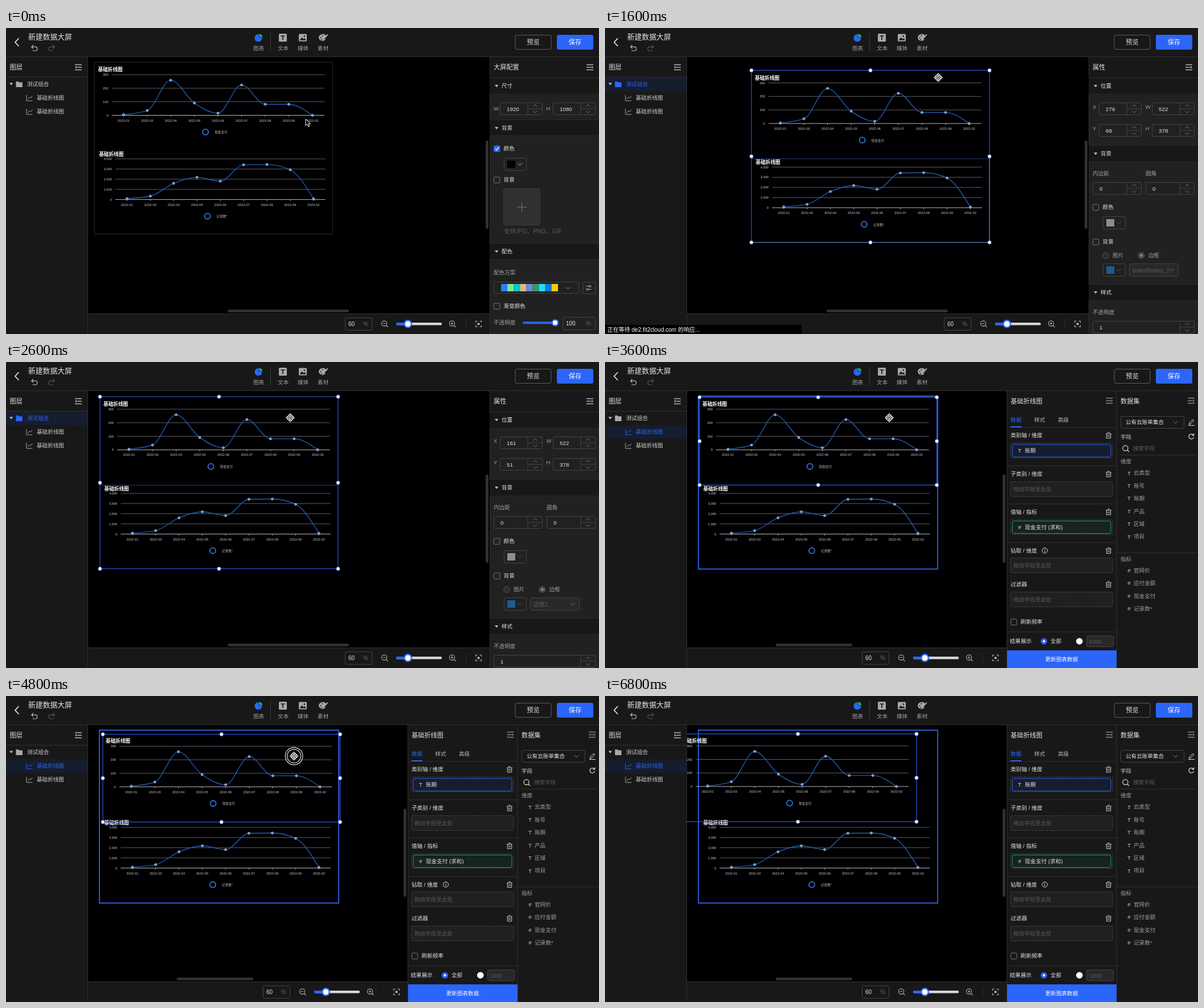
An HTML page for the animation above (6.9 s loop, 1041 by 538 pixels).

```html
<!DOCTYPE html>
<html lang="zh-CN">
<head>
<meta charset="utf-8">
<style>
html, body { margin: 0; width: 100%; height: 100%; overflow: hidden; background: #000; }
svg { display: block; width: 100%; height: 100%; font-family: "Liberation Sans", "Noto Sans CJK SC", "Noto Sans CJK JP", sans-serif; }
text { white-space: pre; }
</style>
</head>
<body>
<svg id="stage" viewBox="0 0 1041 538" xmlns="http://www.w3.org/2000/svg"></svg>
<script>
const BLUE = '#2b65fa', LIGHT = '#e4e4e4', GRAY = '#a0a0a0', DIM = '#5c5c5c';
const EDGE = '#444', BAR = '#181818', BODY = '#212121', RULE = '#303030';

// --- drawing helpers ---
const rect = (x, y, w, h, fill, stroke = 'none', r = 0, more = '') =>
  `<rect x="${x}" y="${y}" width="${w}" height="${h}" rx="${r}" fill="${fill}" stroke="${stroke}" ${more}/>`;
const line = (d, color, w = 1, more = '') =>
  `<path d="${d}" fill="none" stroke="${color}" stroke-width="${w}" ${more}/>`;
const shape = (d, fill, more = '') => `<path d="${d}" fill="${fill}" ${more}/>`;
const disc = (x, y, r, fill, stroke = 'none', w = 1) =>
  `<circle cx="${x}" cy="${y}" r="${r}" fill="${fill}" stroke="${stroke}" stroke-width="${w}"/>`;
const text = (x, y, s, fill = LIGHT, size = 9.6, more = '') =>
  `<text x="${x}" y="${y + size * .36}" font-size="${size}" fill="${fill}" ${more}>${s}</text>`;
const mid = 'text-anchor="middle"', end = 'text-anchor="end"';
const group = (id, body, more = '') => `<g id="${id}" ${more}>${body}</g>`;
const at = (x, y, body) => `<g transform="translate(${x} ${y})">${body}</g>`;

// --- small controls ---
const chevron = (x, y, s = 4, color = '#888', dir = 1) =>
  line(`M${x - s} ${y - dir * s / 2}l${s} ${dir * s}l${s} ${-dir * s}`, color);
const caret = (x, y) => shape(`M${x - 3} ${y - 2}h6.4l-3.2 4.2z`, '#bbb');
const box = (x, y, w, h, fill = 'none') => rect(x + .5, y + .5, w - 1, h - 1, fill, EDGE, 2.5);
const check = (y, label, on, x = 856) =>
  rect(x + .5, y - 5, 10.4, 10.4, on ? BLUE : 'none', on ? BLUE : '#777', 1.5) +
  (on ? line(`M${x + 3} ${y}l2.3 2.5l4-5`, '#fff', 1.3) : '') + text(x + 17.6, y, label);
const spin = (x, y, w, value, id = '', pad = 12) => {
  const s = x + w - 26;
  return box(x, y, w, 22) + line(`M${s} ${y}v22M${s} ${y + 11}h26`, EDGE) +
    chevron(s + 13, y + 5.5, 3.6, '#777', -1) + chevron(s + 13, y + 16.5, 3.6, '#777') +
    text(x + pad, y + 11.5, value, LIGHT, 9.8, id && `id="${id}"`);
};
const swatch = (y, fill, color) => box(874, y, 40, 23) + rect(880, y + 5, 14, 13, fill) + chevron(902, y + 11.5, 4, color);
const section = (y, h, name) =>
  rect(849, y, 192, h, BAR) + line(`M849 ${y + .5}h192M849 ${y + h - .5}h192`, '#2a2a2a') +
  caret(861, y + 15) + text(870, y + 14.5, name);
const foldIcon = (x, y, dir, color = '#b5b5b5') =>
  line(`M${x - 6} ${y - 4.5}h12M${x - 6 + (dir < 0 ? 4 : 0)} ${y}h8M${x - 6} ${y + 4.5}h12`, color, 1.3) +
  shape(`M${x + dir * 6} ${y}l${-dir * 3} -2.3v4.6z`, color);
const trash = (x, y) =>
  line(`M${x - 5} ${y - 3}h10M${x - 2} ${y - 5}h4M${x - 3.7} ${y - 3}v8h7.4v-8M${x - 1.2} ${y - 1}v4M${x + 1.2} ${y - 1}v4`, '#ccc');
const chartIcon = (y, color) =>
  line(`M36 ${y - 5}v10h10.5M38.5 ${y + 2}l2.8-3.5l2 1.6l3-3.6`, color);
const knob = (x, y, r) => disc(x, y, r, '#fff', BLUE, 2.4);
const handles = (x, y, w, h) =>
  [[0, 0], [.5, 0], [1, 0], [0, .5], [1, .5], [0, 1], [.5, 1], [1, 1]]
    .map(([a, b]) => disc(x + a * w, y + b * h, 3.1, '#fff', '#5c86d8', .9)).join('');

// --- line charts ---
const MONTHS = ['01', '03', '04', '05', '06', '07', '08', '09', '02'];

function smooth(pts) {
  const n = pts.length, dx = pts[1][0] - pts[0][0];
  const s = pts.slice(1).map((p, i) => (p[1] - pts[i][1]) / dx);
  const m = pts.map((_, i) => {
    if (!i || i === n - 1) return 0;
    const a = s[i - 1], b = s[i];
    return (Math.sign(a) + Math.sign(b)) * Math.min(Math.abs(a), Math.abs(b), Math.abs(a + b) / 4);
  });
  m[0] = (3 * s[0] - m[1]) / 2;
  m[n - 1] = (3 * s[n - 2] - m[n - 2]) / 2;
  let d = `M${pts[0]}`;
  for (let i = 1; i < n; i++) {
    const [x0, y0] = pts[i - 1], [x1, y1] = pts[i], k = dx / 3;
    d += `C${x0 + k},${y0 + k * m[i - 1]} ${x1 - k},${y1 - k * m[i]} ${x1},${y1}`;
  }
  return d;
}

function chart({ x, y, w, step, rows, gap, first, ys, tx, ty, ring, legend }) {
  const base = y + gap * (rows.length - 1);
  const pts = ys.map((v, i) => [first + i * step, v]);
  return rows.map((r, i) => {
    const gy = y + i * gap;
    return line(`M${x} ${gy}h${w}`, i < rows.length - 1 ? '#6a6a6a' : '#d0d0d0', .9) +
      text(x - 6, gy, r, '#d0d0d0', 5.76, end);
  }).join('') +
    pts.map(([px], i) => line(`M${px} ${base}v2.6`, '#d0d0d0', .8) +
      text(px, base + 9, '2022-' + MONTHS[i], '#d0d0d0', 5.76, mid)).join('') +
    line(smooth(pts), '#2a6fd0', 1.1) +
    pts.map(([px, py]) => disc(px, py, 1.8, '#2a7be0', '#e8f2ff', .9)).join('') +
    text(tx, ty, '基础折线图', '#fff', 8.64, 'font-weight="700"') +
    disc(ring[0], ring[1], 5, 'none', '#2f78dc', 1.8) +
    text(ring[0] + 16, ring[1] + .3, legend, '#bdbdbd', 5.6);
}

const chart1 = chart({ x: 195, y: 83, w: 373.5, step: 41.43, rows: ['300', '200', '100', '0'], gap: 23.8,
  first: 215.8, ys: [153.3, 146, 92.7, 132.8, 150.7, 101.2, 135, 135, 154.4],
  tx: 171, ty: 74, ring: [359.6, 183.7], legend: '现金支付' });
const chart2 = chart({ x: 201.3, y: 231, w: 368.7, step: 40.94, rows: ['4,000', '3,000', '2,000', '1,000', '0'], gap: 17.87,
  first: 221.8, ys: [300.8, 296.5, 274, 263.4, 270.1, 241.4, 240.9, 250.2, 301.2],
  tx: 172.6, ty: 222.5, ring: [363, 331.7], legend: '记录数*' });

// --- fixed frame ---
const toolbar = rect(0, 0, 1041, 51, BAR) + line('M0 50.5h1041', RULE) +
  line('M22.5 18l-6.5 7l6.5 7', '#f2f2f2', 1.6) + text(39, 15.5, '新建数据大屏', LIGHT, 12.8) +
  line('M48 30l-3.2 3.2l3.2 3.2M45 33.2h6.5a3.4 3.4 0 0 1 0 6.8h-5', '#bdbdbd', 1.2) +
  line('M82 30l3.2 3.2l-3.2 3.2M85 33.2h-6.5a3.4 3.4 0 0 0 0 6.8h5', '#555', 1.2) +
  disc(443, 17.5, 6.6, BLUE) + shape('M444.2 16.3v-6.3a6.4 6.4 0 0 1 6.3 6.3z', '#22b573', `stroke="${BAR}" stroke-width=".8"`) +
  line('M464.5 9v32', '#3c3c3c') +
  rect(479, 10, 14, 14, '#a8a8a8', 'none', 1.5) + line('M482.5 14h7M486 14v7', BAR, 1.7) +
  rect(514, 10.5, 14, 13, '#a8a8a8', 'none', 1.5) + shape('M515.5 21.5l4-5l3 3l1.8-1.8l2.5 3.8z', BAR) + disc(523.8, 14.4, 1.3, BAR) +
  shape('M549 17.5a7 6.8 0 0 1 13-3.5l-5 5l4 1a6.8 6.8 0 0 1-12-2.5z', '#a8a8a8') +
  line('M564.8 11.5l-7.5 8', '#a8a8a8', 2) + disc(552.5, 17, 1.1, BAR) + disc(555.5, 13.6, 1.1, BAR) + disc(554, 20.6, 1.1, BAR) +
  ['图表', '文本', '媒体', '素材'].map((s, i) => text([443.5, 486.5, 521.5, 556.7][i], 35.5, s, GRAY, 9.6, mid)).join('') +
  rect(894, 12.5, 63, 25, 'none', '#5c5c5c', 3) + text(925.5, 25, '预览', LIGHT, 11.2, mid) +
  rect(967, 12, 64, 26, BLUE, 'none', 3) + text(999, 25, '保存', '#fff', 11.2, mid);

const layerRow = (i, label) => {
  const y = 99 + 24 * i;
  const draw = (icon, color) => (i ? chartIcon(y, icon) : shape(`M17.5 ${y - 5}h4l1.4 1.6h6v8.4h-11.4z`, icon)) +
    text(i ? 54 : 37, y, label, color);
  return group('row' + i, draw('#a8a8a8', '#d0d0d0')) +
    group('rowOn' + i, rect(0, y - 12, 143, 24, '#151d2e') + draw(BLUE, BLUE));
};
const layers = rect(0, 51, 144, 487, BAR) + line('M143.5 51v487M0 86.5h143', RULE) +
  text(6.5, 69, '图层', LIGHT, 11.2) + foldIcon(127, 69, -1) +
  layerRow(0, '测试组合') + layerRow(1, '基础折线图') + layerRow(2, '基础折线图') + caret(9, 98.5);

const lens = (x, plus) => disc(x - 1, 519.5, 4.6, 'none', '#b0b0b0', 1.1) +
  line(`M${x + 2.5} 523l3 3M${x - 3.2} 519.5h4.4${plus ? `M${x - 1} 517.3v4.4` : ''}`, '#b0b0b0', 1.1);
const zoomBar = rect(100, 502, 941, 36, BAR) + line('M100 502.5h941', RULE) +
  box(595, 509, 48, 23) + text(601, 520.5, '60', LIGHT, 10) + text(627, 520.5, '%', '#666', 10) +
  lens(665) + lens(784, true) + rect(685, 518, 80, 4.4, '#d4d6da', 'none', 2) + rect(685, 518, 21, 4.4, BLUE, 'none', 2) +
  knob(705.5, 520.3, 6.3) + line('M807.5 513v15', '#2c2c2c') +
  line('M824.5 518v-2.7h3M831.5 515.3h3v2.7M834.5 522.5v2.8h-3M827.5 525.3h-3v-2.8', '#b8b8b8', 1.1) + disc(829.5, 520.3, 2.1, '#b8b8b8');

// --- right panels ---
const side = title => rect(849, 51, 192, 487, BODY) + rect(849, 51, 192, 36, BAR) + line('M849.5 51v487', RULE) +
  text(856, 69, title, LIGHT, 11.2) + foldIcon(1025, 69, 1);
const PALETTE = ['#2583f3', '#86e58a', '#08c4cd', '#dcb78a', '#7388cf', '#36966f', '#22dcf7', '#1277cb', '#fcca04'];

const screenPanel = side('大屏配置') + section(87, 30, '尺寸') +
  text(856, 142, 'W', GRAY) + spin(867, 131, 75, '1920') + text(948.5, 142, 'H', GRAY) + spin(960, 131, 75, '1080') +
  section(161, 29, '背景') + check(212, '颜色', true) + swatch(228, '#000', '#bbb') + check(267, '背景') +
  rect(873.5, 282.5, 64, 64, '#303030', '#393939', 2) + line('M905.5 306v18M896.5 315h18', '#777') +
  text(874, 357.5, '支持JPG、PNG、GIF', DIM, 10.4) + section(378, 30, '配色') +
  text(856, 429.5, '配色方案', GRAY) + box(856, 446, 150, 21) +
  PALETTE.map((c, i) => rect(869 + i * 11.1, 450, 11.2, 13, c)).join('') + chevron(986.5, 457) + box(1012, 446, 23, 22) +
  line('M1018.5 454h9M1018.5 459.5h9', '#bbb') + disc(1025, 454, 1.6, BAR, '#bbb') + disc(1021, 459.5, 1.6, BAR, '#bbb') +
  check(489, '渐变颜色') + text(856, 518, '不透明度', GRAY) + rect(907, 516.2, 57, 4, BLUE, 'none', 2) + knob(964, 518.2, 5.3) +
  box(977, 508, 58, 23) + text(983, 519.5, '100', LIGHT, 10) + text(1018, 519.5, '%', '#666', 10);

const radio = (x, y, label, on) => disc(x, y, 5.3, on ? '#4a4a4a' : '#2c2c2c', '#555') + (on ? disc(x, y, 2, '#999') : '') + text(x + 12, y, label, GRAY);
const propPanel = side('属性') + section(87, 30, '位置') +
  text(856, 138.5, 'X', GRAY) + spin(867, 131, 75, '276', 'posX') + text(948.5, 138.5, 'W', GRAY) + spin(960, 131, 75, '522') +
  text(856, 177, 'Y', GRAY) + spin(867, 169, 75, '68', 'posY') + text(948.5, 177, 'H', GRAY) + spin(960, 169, 75, '378') +
  section(206, 30, '背景') + text(856, 256, '内边距', GRAY) + text(949, 256, '圆角', GRAY) +
  spin(856, 271, 86, '0') + spin(949, 271, 86, '0') + check(315, '颜色') + swatch(331, '#8d8d8d', '#555') +
  check(376, '背景') + radio(879, 400, '图片') + radio(941.5, 400, '边框', true) + swatch(414, '#1b5c92', '#555') +
  box(920, 414, 87, 23, '#282828') + chevron(994.5, 425.5, 4, '#777') + text(926, 426, '边框1', DIM, 10, 'id="frameName"') +
  section(450, 30, '样式') + text(856, 500, '不透明度', GRAY) + spin(856, 515, 179, '1');

const dashed = (y, fill = 'none') => rect(712, y + .5, 179, 26, fill, '#4c4c4c', 2, 'stroke-dasharray="2.5 1.8"');
const dropZone = y => dashed(y, '#202020') + text(717, y + 14, '拖动字段至此处', DIM);
const chip = (y, color, fill, mark, label) => dashed(y - 3) + rect(715, y, 173, 22, fill, color, 3) +
  text(728, y + 11, mark, LIGHT, 9.6, mid) + text(737, y + 11, label);
const head = (y, label) => text(712, y, label) + trash(884, y);
const fields = (mark, y, names) => names.map((s, i) =>
  text(920, y + i * 22.4, mark, '#d0d0d0', 9.8, mid) + text(928, y + i * 22.4, s, GRAY)).join('');

const dataPanel = rect(705, 51, 336, 487, BAR) + line('M705.5 51v487M898 51v487', RULE) +
  text(712, 69, '基础折线图', LIGHT, 11.2) + foldIcon(885.5, 68, 1, '#888') +
  text(712, 101.5, '数据', BLUE) + text(753.5, 101.5, '样式', '#b8b8b8') + text(795, 101.5, '高级', '#b8b8b8') +
  line('M706 115h192M706 182.5h192M706 249.5h192M706 317.5h192M706 474.5h192M898 335.5h143', RULE) + rect(712, 113, 19, 2, BLUE) +
  head(129, '类别轴 / 维度') + chip(145, BLUE, '#171d2d', 'T', '账期') +
  head(197, '子类别 / 维度') + dropZone(210) +
  head(263.5, '值轴 / 指标') + chip(279.5, '#13a37c', '#17231f', '#', '现金支付 (求和)') +
  head(331.5, '钻取 / 维度') + disc(772, 331.5, 4.6, 'none', '#ddd') + line('M772 330.6v3.4M772 328.5v1.2', '#ddd') + dropZone(344) +
  head(391, '过滤器') + dropZone(404) + check(457, '刷新频率', false, 712) +
  text(710.5, 490.5, '结果展示') + disc(770.5, 491, 5.6, BLUE) + disc(770.5, 491, 2.1, '#fff') + text(782, 490.5, '全部') +
  disc(832.8, 491, 5.8, '#fff') + box(845, 481, 48, 20, '#282828') + text(849.5, 491, '1000', DIM, 9.8) +
  rect(706, 507, 192, 31, BLUE) + text(801.5, 522.5, '更新图表数据', '#fff', 9.6, mid) +
  text(905, 69, '数据集', LIGHT, 11.2) + foldIcon(1029, 68, 1, '#888') + box(905, 95, 112, 22) + text(914, 105.5, '公有云账单集合') + chevron(1001.5, 106) +
  line('M1025 110l.8-3l6-6l2 2l-6 6zM1024 111.5h11', '#ddd') +
  text(905, 131.5, '字段', '#ccc') + line('M1033 128.5a4.4 4.4 0 1 0 .6 3.6M1033.6 125.5v3.4h-3.4', '#ddd', 1.2) +
  disc(913.5, 151.5, 4.6, 'none', '#ddd', 1.2) + line('M917 155l3 3', '#ddd', 1.2) + text(927, 152, '搜索字段', DIM) + line('M905 163.5h131', '#333') +
  text(905, 175, '维度', GRAY) + fields('T', 195, ['云类型', '账号', '账期', '产品', '区域', '项目']) +
  text(905, 346.5, '指标', GRAY) + fields('#', 366.5, ['官网价', '应付金额', '现金支付', '记录数*']);

// --- canvas area and pointer ---
const board = group('board',
  group('idleBox', rect(165, 61, 417.5, 302, 'none', '#2a2a2a')) +
  group('pickedBox', line('M165 216.5h418', '#2b3f9c', .9) + rect(165, 61, 418, 302.5, 'none', '#3f5ee6', 1) +
    group('restEdge', line('M583 212v151.5h-418', '#6d7484', 1.2)) + handles(165, 61, 418, 302.5)) +
  group('outerBox', rect(164, 60, 420, 304, 'none', '#2f63e4', 0, 'stroke-width="1.8"')) + chart2 +
  group('movable', chart1 + group('chartBox', rect(166, 62, 416.5, 154.3, 'none', '#3159df', 0, 'stroke-width="1.2"') + handles(166, 62, 416.5, 154.3))));

const pointer = group('pointer',
  group('press', disc(0, 0, 15.3, 'rgba(0,0,0,.4)', '#e8e8e8', 1.2) + disc(0, 0, 12, 'none', '#e8e8e8', 1.2)) +
  group('mover', shape('M0-7l3 3h-2v3h3v-2l3 3l-3 3v-2h-3v3h2l-3 3l-3-3h2v-3h-3v2l-3-3l3-3v2h3v-3h-2z', '#111', 'stroke="#fff" stroke-width="1.2"')) +
  group('arrow', shape('M0 0v11.5l2.8-2.5l2 4.6l2-.9l-2-4.4h3.7z', '#000', 'stroke="#fff" stroke-width="1"')));

document.getElementById('stage').innerHTML =
  '<clipPath id="clip"><rect x="144" y="51" width="897" height="451"/></clipPath>' +
  rect(0, 0, 1041, 538, '#000002') + `<g clip-path="url(#clip)">${board}</g>` +
  group('zoom', zoomBar) + toolbar + layers +
  group('barV', rect(842, 198, 5, 155, '#303030', 'none', 2.5)) +
  group('barWide', rect(389, 495, 213, 5, '#303030', 'none', 2.5)) +
  group('barNarrow', rect(299.5, 495, 134.5, 5, '#303030', 'none', 2.5)) +
  group('screenPanel', screenPanel) + group('propPanel', propPanel) + group('dataPanel', dataPanel) +
  group('status', rect(0, 522, 345, 16, '#000') + text(4, 530, '正在等待 de2.fit2cloud.com 的响应...', '#fff', 10)) + pointer;

// --- timeline: [ms, x, y] ---
const LOOP = 6900, PICK_GROUP = 600, PICK_CHART = 3100;
const POINTER = [[0, 526, 160], [500, 484, 73], [700, 484, 73], [1400, 585, 87], [1600, 585, 87], [1800, 591, 111],
  [2500, 499, 98], [3600, 499, 98], [3700, 507, 99], [4200, 584, 105], [5200, 463, 106], [5600, 463, 106], [6100, 480, -20]];
const BOARD = [[700, -9.4, -.9], [1400, 92, 13.5], [1800, 92, 13.5], [2500, 0, 0]];
const CHART = [[3700, 0, 0], [4200, 77, 6.4], [5200, -35.6, 4.7]];
const PRESSED = [[600, 1500], [1800, 2500], [3700, 5500]];

function track(keys, t) {
  if (t <= keys[0][0]) return keys[0].slice(1);
  const i = keys.findIndex(k => k[0] > t);
  if (i < 0) return keys[keys.length - 1].slice(1);
  const [t0, x0, y0] = keys[i - 1], [t1, x1, y1] = keys[i];
  const u = (t - t0) / (t1 - t0), e = u * u * (3 - 2 * u);
  return [x0 + (x1 - x0) * e, y0 + (y1 - y0) * e];
}

const el = id => document.getElementById(id);
const show = (id, on) => { el(id).style.display = on ? '' : 'none'; };
const move = (id, [x, y]) => el(id).setAttribute('transform', `translate(${x.toFixed(2)} ${y.toFixed(2)})`);

function render(t) {
  const idle = t < PICK_GROUP, single = t >= PICK_CHART, whole = !idle && !single;
  const pos = track(BOARD, t), tip = track(POINTER, t);
  const waiting = t >= 700 && t < 2000;

  move('board', pos);
  move('movable', track(CHART, t));
  move('pointer', tip);
  move('zoom', [single ? -144 : 0, 0]);
  move('barV', [single ? -144 : 0, 0]);

  for (const [id, on] of [
    ['idleBox', idle], ['pickedBox', whole], ['outerBox', single], ['chartBox', single],
    ['restEdge', t >= 1400 && t < 1800], ['screenPanel', idle], ['propPanel', whole], ['dataPanel', single],
    ['barWide', !single], ['barNarrow', single], ['status', waiting],
    ['row0', !whole], ['rowOn0', whole], ['row1', !single], ['rowOn1', single], ['rowOn2', false],
    ['arrow', idle || tip[1] < 60], ['mover', !idle && tip[1] >= 60],
    ['press', PRESSED.some(([a, b]) => t >= a && t < b)]
  ]) show(id, on);

  el('posX').textContent = Math.round(161 + pos[0] / .8);
  el('posY').textContent = Math.round(51 + pos[1] / .8);
  el('frameName').textContent = t < 2000 ? 'board/board_1' : '边框1';
}

const start = performance.now();
function tick() {
  const t = (performance.now() - start) % LOOP;
  render(Math.floor(t / 100) * 100);
  requestAnimationFrame(tick);
}
tick();
</script>
</body>
</html>
```
